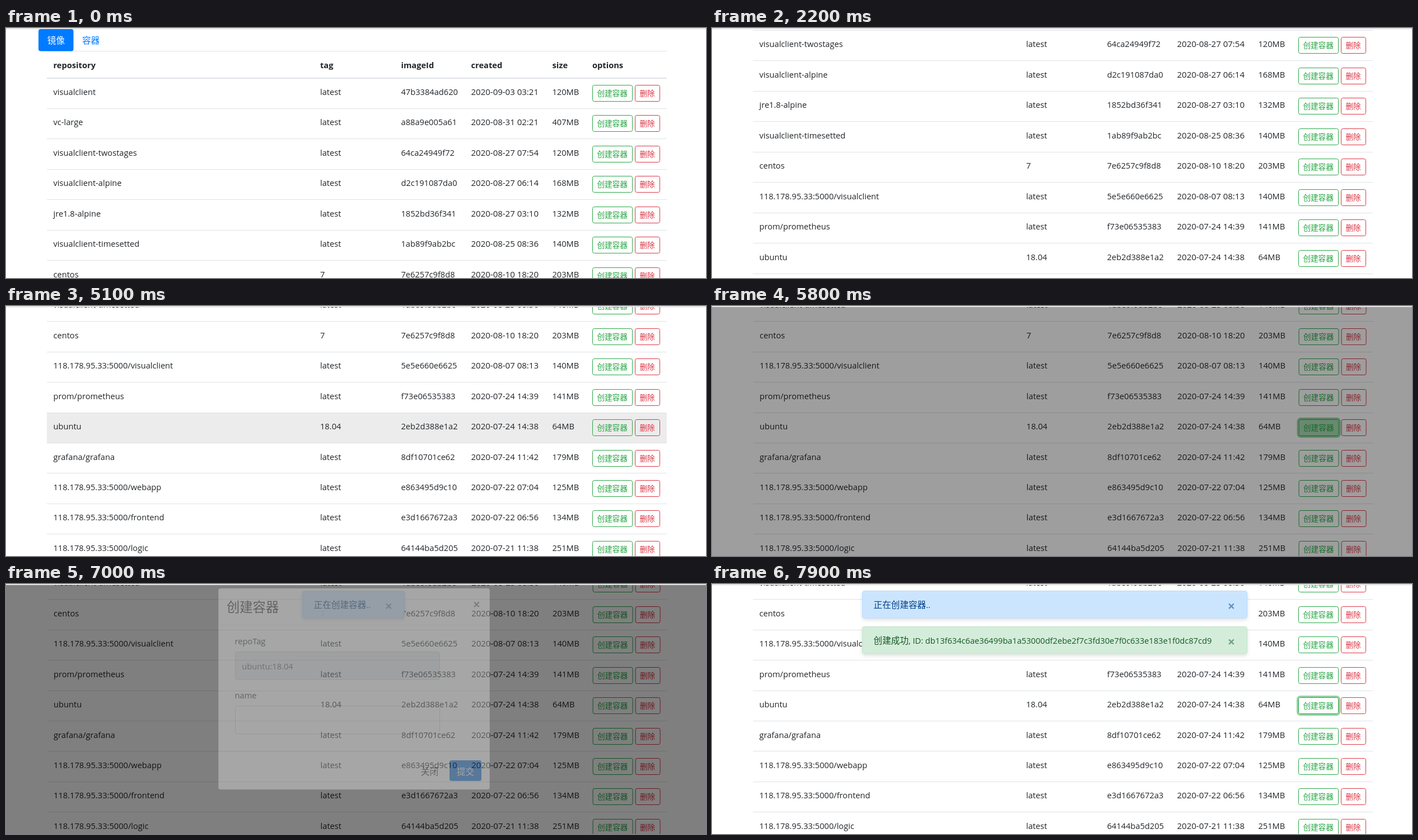
An HTML page that plays this animation: 1250 by 448 pixels, repeating every 8000 ms.

```html
<!DOCTYPE html>
<html lang="zh-CN">
<head>
<meta charset="utf-8">
<title>镜像</title>
<style>
  html, body { margin: 0; width: 100%; height: 100%; overflow: hidden; background: #fff; }
  svg { display: block; width: 1250px; height: 448px; }
  text { font: 14.65px "Open Sans", "Noto Sans CJK SC", "Noto Sans CJK", sans-serif; fill: #212529; white-space: pre; }
  .bold { font-weight: 700; }
  .cjk { font-size: 15.6px; }
  .date { font-size: 15px; }
  .title { font-size: 23.3px; }
  .small { font-size: 13.6px; }
  .close { font-size: 23.3px; font-weight: 700; text-anchor: middle; opacity: .5; }
  .toast { filter: drop-shadow(0 3px 3px rgba(0, 0, 0, .12)); }
</style>
</head>
<body>
<svg id="stage" viewBox="0 0 1250 448"></svg>
<script>
const LOOP = 8000, ROW_TOP = 90, ROW_PITCH = 54.45, NOTCH = 97.25;
const LINE = '#dee2e6', BLUE = '#007bff', GREEN = '#28a745', RED = '#dc3545';
const COLUMNS = [84.5, 561, 705.5, 830.5, 975.5, 1047];
const DATE = 3, UBUNTU = 9, WEBAPP = 11;

const images = `visualclient|latest|47b3384ad620|2020-09-03 03:21|120MB
vc-large|latest|a88a9e005a61|2020-08-31 02:21|407MB
visualclient-twostages|latest|64ca24949f72|2020-08-27 07:54|120MB
visualclient-alpine|latest|d2c191087da0|2020-08-27 06:14|168MB
jre1.8-alpine|latest|1852bd36f341|2020-08-27 03:10|132MB
visualclient-timesetted|latest|1ab89f9ab2bc|2020-08-25 08:36|140MB
centos|7|7e6257c9f8d8|2020-08-10 18:20|203MB
118.178.95.33:5000/visualclient|latest|5e5e660e6625|2020-08-07 08:13|140MB
prom/prometheus|latest|f73e06535383|2020-07-24 14:39|141MB
ubuntu|18.04|2eb2d388e1a2|2020-07-24 14:38|64MB
grafana/grafana|latest|8df10701ce62|2020-07-24 11:42|179MB
118.178.95.33:5000/webapp|latest|e863495d9c10|2020-07-22 07:04|125MB
118.178.95.33:5000/frontend|latest|e3d1667672a3|2020-07-22 06:56|134MB
118.178.95.33:5000/logic|latest|64144ba5d205|2020-07-21 11:38|251MB`
  .split('\n').map(line => line.split('|'));

function el(parent, tag, attrs = {}, content = '') {
  const node = document.createElementNS('http://www.w3.org/2000/svg', tag);
  set(node, attrs);
  node.textContent = content;
  return parent.appendChild(node);
}
function set(node, attrs) {
  for (const key in attrs) node.setAttribute(key, attrs[key]);
}
const group = (parent, attrs) => el(parent, 'g', attrs);
const rect = (parent, x, y, width, height, fill, more) =>
  el(parent, 'rect', { x, y, width, height, fill, ...more });
const text = (parent, x, y, content, cls = '', fill = '#212529') => {
  const node = el(parent, 'text', { x, y, class: cls }, content);
  node.style.fill = fill;
  return node;
};

const stage = document.getElementById('stage');
const page = group(stage);

// Tabs and table head
const head = group(page);
rect(head, 73, 41, 1107, 1, LINE);
rect(head, 58, 2, 62.5, 39.5, BLUE, { rx: 4 });
text(head, 73.8, 28.4, '镜像', 'cjk', '#fff');
text(head, 136, 28.4, '容器', 'cjk', BLUE);
['repository', 'tag', 'imageId', 'created', 'size', 'options']
  .forEach((name, i) => text(head, COLUMNS[i], 71.5, name, 'bold'));
rect(head, 73, 89, 1107, 2, LINE);

function outlineButton(parent, x, width, label, color) {
  const box = rect(parent, x + .5, 12.5, width, 29, color, { rx: 3, stroke: color, 'fill-opacity': 0 });
  const caption = text(parent, x + 8.4, 32.3, label, 'small', color);
  return { box, caption };
}

const rows = images.map((cells, i) => {
  const g = group(page);
  const hover = rect(g, 73, 0, 1107, 54, '#000', { opacity: 0 });
  const line = i ? rect(g, 73, 0, 1107, 1, LINE) : null;
  cells.forEach((cell, c) => text(g, COLUMNS[c], 30, cell, c === DATE ? 'date' : ''));
  const create = outlineButton(g, 1047, 71, '创建容器', GREEN);
  outlineButton(g, 1123, 44, '删除', RED);
  return { g, hover, line, create };
});
const ring = rect(rows[UBUNTU].g, 1045.5, 10.5, 75, 33, 'none',
  { rx: 5, stroke: GREEN, 'stroke-width': 3, 'stroke-opacity': .5 });

function makeToast(y, message, detail, fill, border, color) {
  const g = group(stage, { class: 'toast' });
  const box = rect(g, 0, y, 0, 48.5, fill, { rx: 4, stroke: border });
  const label = text(g, 0, y + 30.5, '', '', color);
  el(label, 'tspan', { class: 'cjk' }, message);
  el(label, 'tspan', {}, detail);
  const close = text(g, 0, y + 35, '×', 'close', color);
  const place = (left, right) => {
    set(box, { x: left + .5, width: right - left - 1 });
    set(label, { x: left + 20.6 });
    set(close, { x: right - 28.5 });
  };
  return { g, place };
}
const pending = makeToast(12.5, '正在创建容器', '..', '#cce5ff', '#b8daff', '#004085');
const success = makeToast(76.5, '创建成功', ', ID: db13f634c6ae36499ba1a53000df2ebe2f7c3fd30e7f0c633e183e1f0dc87cd9',
  '#d4edda', '#c3e6cb', '#155724');
success.place(268, 956);

const backdrop = rect(stage, 0, 2, 1250, 446, '#000');

// Dialog, drawn in its resting place
const modal = group(stage);
rect(modal, 379, 31.5, 485, 361, '#fff', { rx: 4, stroke: '#000', 'stroke-opacity': .2 });
text(modal, 394, 73.6, '创建容器', 'title');
text(modal, 840.5, 68.6, '×', 'close', '#000');
rect(modal, 379, 97, 485, 1, '#e9ecef');
text(modal, 408.5, 132, 'repoTag');
rect(modal, 409.5, 145.5, 365, 50, '#e9ecef', { rx: 4, stroke: '#ced4da' });
text(modal, 421.3, 177, 'ubuntu:18.04', '', '#495057');
text(modal, 408.5, 229.3, 'name');
rect(modal, 409.5, 242.5, 365, 50, '#fff', { rx: 4, stroke: '#ced4da' });
rect(modal, 379, 324, 485, 1, '#e9ecef');
text(modal, 740.8, 365.6, '关闭', 'cjk');
const submit = rect(modal, 792, 340, 57, 37, BLUE, { rx: 4 });
text(modal, 805, 365.6, '提交', 'cjk', '#fff');

// Browser edge above the page
rect(stage, 0, 0, 1250, 1, '#eee');
rect(stage, 0, 1, 1250, 1, '#d6d6d6');

// Each step changes some values of the state and keeps the rest.
const start = {
  scroll: 0, hover: -1, fill: 0, ring: 0, shade: 0, shift: 0, lines: 1,
  modal: 0, modalY: -48, submit: BLUE, pending: 0, wide: false, success: 0
};
const steps = [
  [1200, { scroll: 13 }],
  [1300, { scroll: 76 }],
  [1400, { scroll: NOTCH }],
  [2100, { scroll: NOTCH + 55 }],
  [2200, { scroll: NOTCH * 2 }],
  [3000, { scroll: NOTCH * 2 + 55 }],
  [3100, { scroll: NOTCH * 3 }],
  [3900, { scroll: 304.5 }],
  [4000, { scroll: NOTCH * 3 + 76 }],
  [4100, { scroll: NOTCH * 4 }],
  [5100, { hover: UBUNTU }],
  [5200, { fill: .5 }],
  [5300, { fill: 1 }],
  [5700, { ring: 1, shade: .1 }],
  [5800, { hover: -1, fill: .4, shade: .38, shift: .6 }],
  [5900, { fill: 0, shade: .5 }],
  [6000, { modal: .35, modalY: -24 }],
  [6100, { modal: .97, modalY: -4 }],
  [6200, { modal: 1, modalY: 0 }],
  [6600, { submit: '#0069d9' }],
  [6900, { modal: .85, modalY: -4, ring: 0, pending: .4 }],
  [7000, { modal: .3, modalY: -24, pending: .9 }],
  [7100, { modal: 0, shade: .38, pending: 1 }],
  [7200, { shade: .118, lines: .1 }],
  [7300, { shade: 0, lines: 1 }],
  [7400, { ring: 1, shift: 0 }],
  [7500, { hover: WEBAPP }],
  [7700, { wide: true, success: .3 }],
  [7800, { hover: -1, success: .75 }],
  [7900, { success: 1 }]
];

function render(time) {
  const s = Object.assign({}, start, ...steps.filter(([at]) => at <= time).map(([, change]) => change));
  set(page, { transform: `translate(${s.shift} 0)` });
  set(head, { transform: `translate(0 ${-Math.round(s.scroll)})` });
  rows.forEach(({ g, hover, line }, i) => {
    // Contents snap to the nearest pixel, borders to the pixel above.
    const top = ROW_TOP + ROW_PITCH * i - s.scroll;
    const y = Math.round(top);
    set(g, { transform: `translate(0 ${y})` });
    set(hover, { opacity: i === s.hover ? .075 : 0 });
    if (line) set(line, { y: Math.floor(top) - y, opacity: s.lines });
  });
  const { box, caption } = rows[UBUNTU].create;
  set(box, { 'fill-opacity': s.fill });
  caption.style.fill = s.fill > .4 ? '#fff' : GREEN;
  set(ring, { opacity: s.ring });
  set(backdrop, { opacity: s.shade });
  set(modal, { opacity: s.modal, transform: `translate(0 ${s.modalY})` });
  set(submit, { fill: s.submit });
  set(pending.g, { opacity: s.pending });
  if (s.wide) pending.place(268, 956);
  else pending.place(529, 712);
  set(success.g, { opacity: s.success });
}

const began = performance.now();
function tick() {
  render((performance.now() - began) % LOOP);
  requestAnimationFrame(tick);
}
tick();
</script>
</body>
</html>
```
